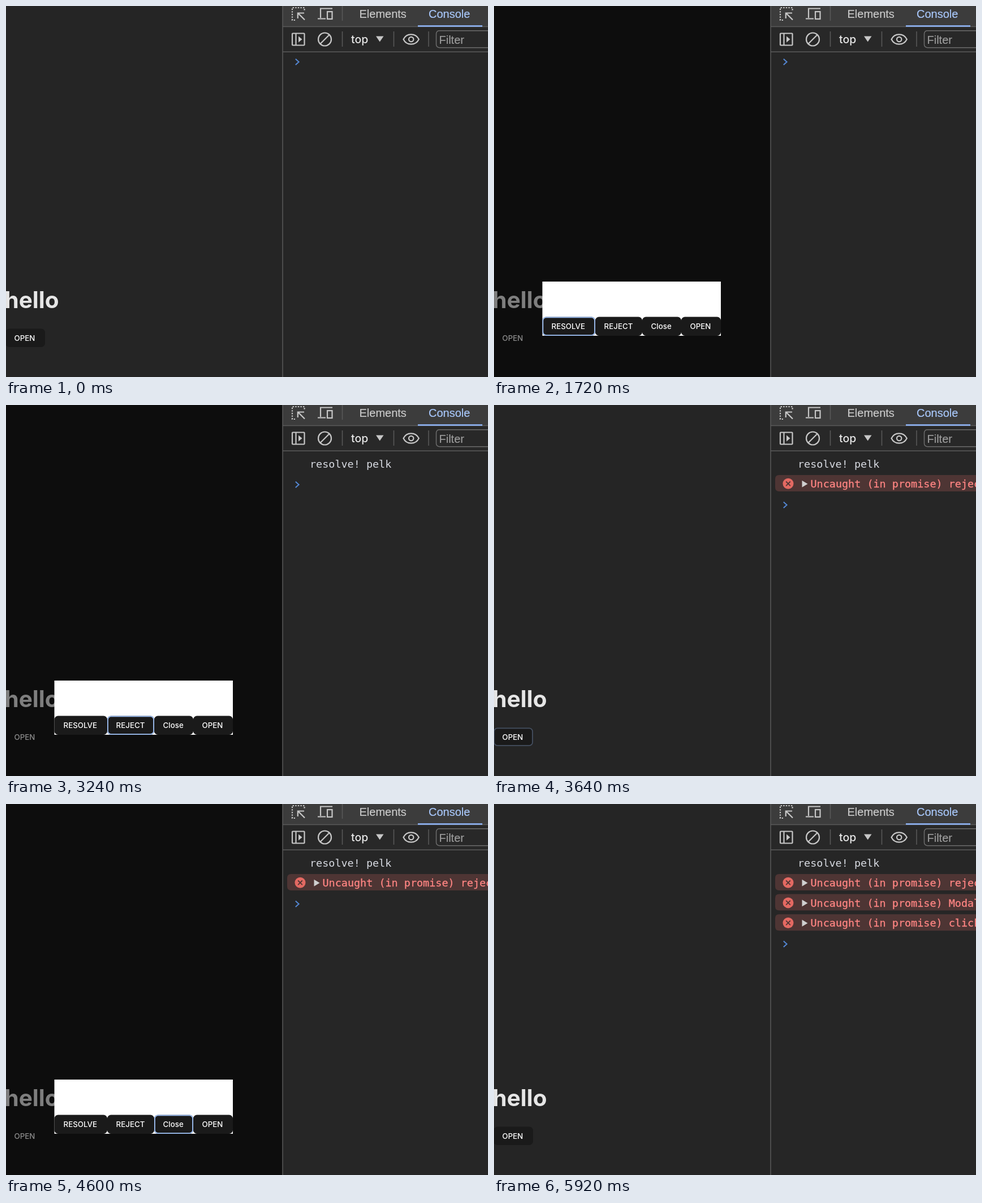
An HTML page for the animation above (6760 ms loop, 852 by 657 pixels).

```html
<!DOCTYPE html>
<html lang="en">
<head>
<meta charset="utf-8">
<title>Promise modal</title>
<style>
  html, body { margin: 0; width: 100%; height: 100%; overflow: hidden; background: #252525; }
  svg { display: block; width: 852px; height: 657px; }
  .button { font: 500 13.3px Inter, sans-serif; fill: #fff; }
  .heading { font: 700 40.5px Inter, sans-serif; fill: #e6e6e6; }
  .ui { font: 20px "Liberation Sans", Arial, sans-serif; fill: #c9c9c9; stroke: #c9c9c9; stroke-width: .2; }
  .ui.active { fill: #a8c7fa; stroke: #a8c7fa; }
  .ui.muted { fill: #9c9c9c; stroke: #9c9c9c; }
  .context { font: 500 19.5px Inter, sans-serif; fill: #e6e6e6; }
  .mono { font: 18.45px "DejaVu Sans Mono", monospace; fill: #d8dbe2; white-space: pre; }
  .error { fill: #ff8583; stroke: #ff8583; stroke-width: .3; }
  .face { fill: #1a1a1a; }
  .ring { fill: none; stroke: #a3c6fc; stroke-width: 1.8; opacity: 0; }
  .icon { fill: none; stroke: #c7c7c7; stroke-width: 2.2; }
  .solid { fill: #c7c7c7; }
  .rule { stroke: #5a5a5a; stroke-width: 1.5; }
  .dim { opacity: .52; }
  .dim .face { fill: none; }
</style>
</head>
<body>
<svg viewBox="0 0 852 657">
  <rect id="backdrop" width="489" height="657" fill="#252525"/>
  <g id="page">
    <text class="heading" x="-2.5" y="535">hello</text>
  </g>
  <g id="dialog">
    <rect x="85.5" y="488" width="315.5" height="96" fill="#fff"/>
  </g>

  <rect x="489" width="363" height="657" fill="#262626"/>
  <rect x="489" width="363" height="36" fill="#3c3c3c"/>
  <rect x="489" y="37" width="363" height="44" fill="#282828"/>
  <path class="rule" d="M489 0V657M489 36.5H852M489 81.3H852"/>
  <path class="rule" d="M594.5 0V26M594.5 45V72M685.5 45V72M747 45V72"/>
  <rect x="728" y="34.2" width="114" height="2.6" fill="#8fb4f5"/>
  <text class="ui" x="624.5" y="21">Elements</text>
  <text class="ui active" x="747" y="21">Console</text>
  <text class="context" x="610" y="66">top</text>
  <rect x="760.5" y="43.7" width="110" height="30" rx="5.5" fill="none" stroke="#6c6c6c" stroke-width="1.5"/>
  <text class="ui muted" x="765.5" y="67">Filter</text>

  <path class="icon" stroke-dasharray="2.4 2.2" d="M511 25H506V3H527.5V9"/>
  <path class="icon" d="M528 24.5L516.5 13M515.8 22V12.5H527"/>
  <path class="icon" d="M577 4.5H556V21M551 22.5H565"/>
  <rect class="icon" x="568" y="10" width="8.5" height="13"/>
  <rect class="icon" x="506" y="48.5" width="21.5" height="21" rx="1"/>
  <path class="icon" d="M512.5 49V69"/>
  <path class="solid" d="M517 53.5V64.5L523.5 59Z"/>
  <circle class="icon" cx="563.5" cy="59" r="11.5"/>
  <path class="icon" d="M555.5 67L571.5 51"/>
  <path class="solid" d="M654 53.5H667.5L660.7 63.5Z"/>
  <path class="icon" d="M702.5 59C708 47.5 724 47.5 729.8 59C724 70.5 708 70.5 702.5 59Z"/>
  <circle class="icon" cx="716.2" cy="59" r="4.2"/>

  <g id="logs">
    <text class="mono" x="537" y="110.5">resolve! pelk</text>
  </g>
  <path id="prompt" d="M511.8 -5.2L517.6 0L511.8 5.2" fill="none" stroke="#5487d3" stroke-width="2"/>
</svg>
<script>
const LOOP = 6760;
const OPEN_SPANS = [[680, 1760], [2520, 3360], [3880, 4640], [5240, 5880]];
const LOG_TIMES = [1800, 3400, 4680, 5920];
const PROMPT_Y = [99, 141, 177, 212, 248];
const ERRORS = ["reject", "Modal closed", "click outside"];

const $ = id => document.getElementById(id);
const add = (parent, markup) => parent.insertAdjacentHTML("beforeend", markup);

// hovers: [fade-in start, fade-in end, fade-out start, fade-out end]
const BUTTONS = [
  { parent: "page", label: "OPEN", x: -.7, y: 571.5, w: 69.7, h: 32.5, textX: 15, hovers: [
    [360, 620, 680, 760], [2280, 2440, 2519, 2520], [3600, 3840, 3880, 3960], [4960, 5200, 5240, 5280]] },
  { parent: "dialog", label: "RESOLVE", x: 85.5, w: 93.5, textX: 102, hovers: [
    [1240, 1480, 1760, 1760], [2720, 2960, 2840, 3080]] },
  { parent: "dialog", label: "REJECT", x: 179, w: 83, textX: 195, hovers: [[2840, 3080, 3360, 3360]] },
  { parent: "dialog", label: "Close", x: 262, w: 69, textX: 278, hovers: [[4200, 4440, 4640, 4640]] },
  { parent: "dialog", label: "OPEN", x: 331, w: 70, textX: 347, hovers: [] }
];

for (const b of BUTTONS) {
  const { x, y = 550.5, w, h = 33.5 } = b;
  const parent = $(b.parent);
  add(parent, `<rect class="face" x="${x}" y="${y}" width="${w}" height="${h}" rx="6.6"/>
    <text class="button" x="${b.textX - .4}" y="${y + h / 2 + 4.9}">${b.label}</text>
    <rect class="ring" x="${x + .9}" y="${y + .9}" width="${w - 1.8}" height="${h - 1.8}" rx="5.8"/>`);
  b.ring = parent.lastElementChild;
}

ERRORS.forEach((reason, i) => {
  add($("logs"), `<g transform="translate(0 ${124 + i * 35.6})">
    <path d="M852 0H504Q497 0 497 7V22Q497 29 504 29H852Z" fill="#4e3534"/>
    <circle cx="520" cy="15.3" r="9.5" fill="#e46962"/>
    <path d="M516.2 11.5L523.8 19.1M523.8 11.5L516.2 19.1" stroke="#4e3534" stroke-width="1.8"/>
    <path d="M544.5 9.8V21.8L554.5 15.8Z" fill="#d0d0d0"/>
    <text class="mono error" x="559.5" y="22">Uncaught (in promise) ${reason}</text></g>`);
});

const ramp = (t, from, to) => {
  if (t >= to) return 1;
  const p = Math.max(0, (t - from) / (to - from || 1));
  return 1 - (1 - p) ** 2;
};
const hoverLevel = (t, [a, b, c, d]) => t < a ? 0 : Math.min(ramp(t, a, b), 1 - ramp(t, c, d));
const logs = [...$("logs").children];

function render(t) {
  const open = OPEN_SPANS.some(([from, to]) => t >= from && t < to);
  $("backdrop").setAttribute("fill", open ? "#0d0d0d" : "#252525");
  $("page").setAttribute("class", open ? "dim" : "");
  $("dialog").style.display = open ? "" : "none";
  for (const b of BUTTONS) {
    b.ring.style.opacity = Math.max(0, ...b.hovers.map(h => hoverLevel(t, h)));
  }
  logs.forEach((row, i) => row.style.display = t >= LOG_TIMES[i] ? "" : "none");
  const count = LOG_TIMES.filter(time => t >= time).length;
  $("prompt").setAttribute("transform", `translate(0 ${PROMPT_Y[count]})`);
}

const start = performance.now();
function tick() {
  render((performance.now() - start) % LOOP);
  requestAnimationFrame(tick);
}
tick();
</script>
</body>
</html>
```
